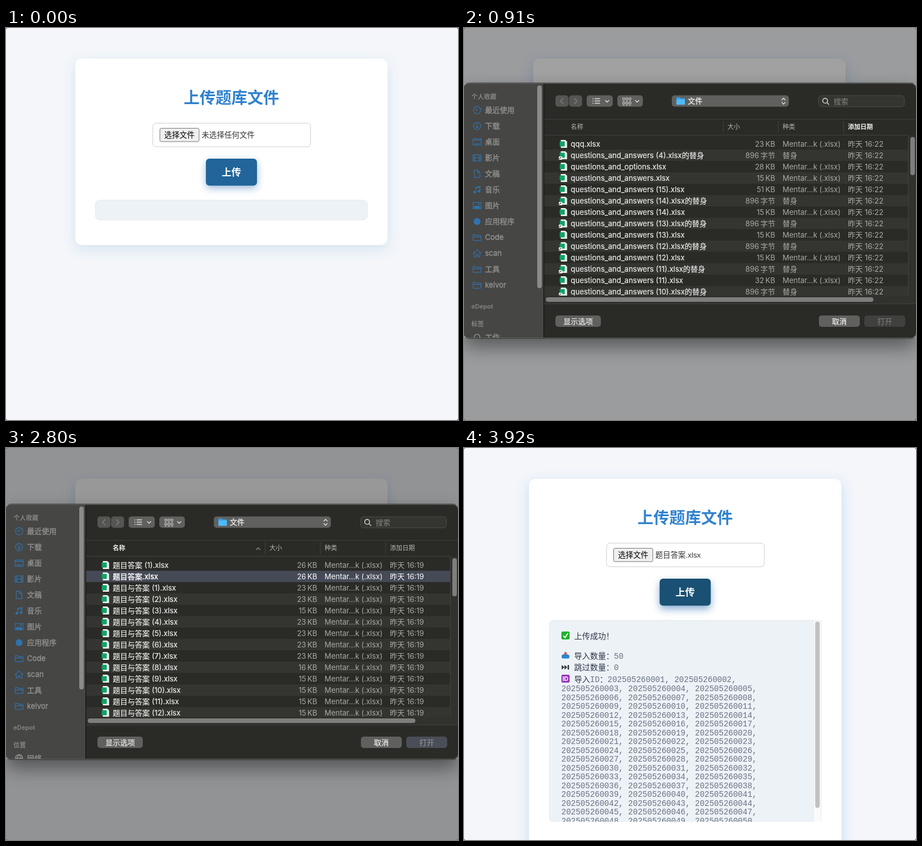
Write an HTML page that moves like this. It is 796 by 690 pixels and loops after 4970 ms.

```html
<!DOCTYPE html>
<html lang="zh-CN">
<head>
<meta charset="utf-8">
<title>上传题库文件</title>
<style>
html, body { margin: 0; width: 100%; height: 100%; overflow: hidden; background: #f4f6fa; }
svg { display: block; width: 100%; height: 100%; }
text { white-space: pre; }
.page { font: 13.33px "Liberation Sans", "Noto Sans CJK SC", sans-serif; }
.log { font: 14px "Liberation Mono", "Noto Sans CJK SC", monospace; fill: #2d3748; }
.thin { fill: #687282; }
.dlg { font: 13px Inter, "Noto Sans CJK SC", sans-serif;
  --side: #464645; --item: #929291; --icon: #2f73ad; --chev: transparent;
  --sel: #464a56; --open: #4a4e58; --openText: #8d8f95; }
.dlg.active { --side: #3a3a39; --item: #efefee; --icon: #1b90f5; --chev: #0b62d9;
  --sel: #0058d0; --open: #0f63dc; --openText: #fff; }
.item { fill: var(--item); stroke: var(--item); stroke-width: .35; }
.icon { fill: none; stroke: var(--icon); stroke-width: 1.2; stroke-linejoin: round; stroke-linecap: round; }
.cap { font-size: 11px; font-weight: 600; fill: #858584; }
.head { font-size: 11px; fill: #b6b7b4; }
.bold { font-weight: 700; fill: #f0f0ee; }
.name { fill: #efefed; stroke: #efefed; stroke-width: .2; }
.info { fill: #a9aaa7; }
.on text { fill: #fff; }
.on .name { stroke: #fff; stroke-width: .4; }
.line { fill: none; stroke: #dededc; stroke-width: 1.4; stroke-linecap: round; stroke-linejoin: round; }
</style>
</head>
<body>
<svg id="stage" viewBox="0 0 796 690" xmlns="http://www.w3.org/2000/svg"></svg>
<script>
const LOOP = 4970, STEP = 70;

const rect = (x, y, w, h, fill, r = 0, more = '') =>
  `<rect x="${x}" y="${y}" width="${w}" height="${h}" rx="${r}" fill="${fill}" ${more}/>`;
const text = (x, y, s, more = '') => `<text x="${x}" y="${y}" ${more}>${s}</text>`;
const path = (d, more = 'class="line"') => `<path d="${d}" ${more}/>`;
const dot = (x, y, r, more = '') => `<circle cx="${x}" cy="${y}" r="${r}" ${more}/>`;
const group = (id, body, more = '') => `<g id="${id}" ${more}>${body}</g>`;

// ---------- upload page ----------
const MID = 'text-anchor="middle"';

function resultLog() {
  const ids = Array.from({ length: 50 }, (_, i) => 202505260001 + i);
  const thin = s => `<tspan class="thin">${s}</tspan>`;
  let s = text(194, 335.5, '上传成功！') + text(194, 371, '导入数量：' + thin(50)) +
    text(194, 391, '跳过数量：' + thin(0)) +
    text(194, 411.5, `导入${thin('ID')}：` + thin(ids.slice(0, 2).join(', ') + ','));
  for (let i = 2, y = 428; i < 50; i += 3, y += 15.5)
    s += text(171.5, y, thin(ids.slice(i, i + 3).join(', ') + (i < 47 ? ',' : '')));
  return s;
}

function logIcons() {
  return rect(171.5, 323, 14.5, 14, '#1db42c', 2.5) +
    path('M175 330.5L178 333.7L183 326', 'fill="none" stroke="#fff" stroke-width="2"') +
    path('M172 365L175 363H182L185.500 365V368.500Q185.500 370.500 183.500 370.500H174Q172 370.500 172 368.500Z', 'fill="#2b86cf"') +
    path('M178.700 358.500L182 362H180V365H177.400V362H175.400Z', 'fill="#d8483c"') +
    path('M172 382L177 386L172 390ZM177 382L182 386L177 390ZM182.500 382H185V390H182.500Z', 'fill="#333c48"') +
    rect(171.5, 399, 14.5, 14, '#9a35bd', 2.5) +
    text(178.7, 410, 'ID', `${MID} style="font:700 10.5px Inter,sans-serif" fill="#fff"`);
}

const page =
  group('cardShade', rect(122, 54, 550, 328, 'inherit', 12, 'id="shadeBox"'), 'filter="url(#b11)"') +
  rect(122, 54, 550, 328, '#fff', 12, 'id="card"') +
  text(397, 133, '上传题库文件', `${MID} font-size="28" font-weight="700" fill="#3182ce"`) +
  rect(258.5, 167.5, 278, 41.5, '#fff', 6, 'id="field"') +
  rect(271, 176.5, 69, 23.5, '#efefef', 2.5, 'stroke="#767676"') +
  text(305.5, 193, '选择文件', `${MID} fill="#000"`) +
  text(344.5, 193, '', 'id="file" fill="#333"') +
  rect(352, 230, 90, 47.5, '#2c6cb0', 6, 'id="btnShade" filter="url(#b7)"') +
  rect(352, 230, 90, 47.5, '', 6, 'id="btn"') +
  text(397, 259.5, '上传', `${MID} font-size="17" font-weight="700" fill="#fff"`) +
  rect(157.5, 303, 479, 35, '#edf2f7', 8, 'id="box" stroke="#e4eaef"');

const result = group('result',
  path('M629 303H158Q150 303 150 311V650Q150 658 158 658H629Z', 'fill="#edf2f7"') +
  path('M616 303.500H158Q150.500 303.500 150.500 311V650Q150.500 658 158 658', 'fill="none" stroke="#e2e8ee"') +
  rect(615, 303, 14, 355, '#fafafa') +
  path('M615 303.500H629M615.500 303V658M629 303V658', 'fill="none" stroke="#e8ebee"') +
  rect(618.5, 305.5, 8, 328, '#c1c1c1', 4) +
  logIcons() + `<g class="log" clip-path="url(#logClip)">${resultLog()}</g>`);

// ---------- file dialog ----------
const FOLDER = 'M-7 4.500V-4Q-7 -5 -6 -5H-2.500L-1 -3.500H6Q7 -3.500 7 -2.500V4.500Q7 5.500 6 5.500H-6Q-7 5.500 -7 4.500ZM-7 -1H7';
const FRAME = 'M-7 -5.500H7V5.500H-7Z';
const RING = dot(0, 0, 6.4);
const p = d => `<path d="${d}"/>`;
const PLACES = [
  ['最近使用', RING + p('M0 -3.500V.300H-3')],
  ['下载', RING + p('M0 -3.500V3.200M-2.500 .800L0 3.300L2.500 .800')],
  ['桌面', p(FRAME + 'M-7 -3H7M-4.500 3.300H4.500')],
  ['影片', p(FRAME + 'M-4 -5.500V5.500M4 -5.500V5.500M-7 -2H-4M-7 2H-4M4 -2H7M4 2H7M-4 0H4')],
  ['文稿', p('M-5 -6.500H1L5 -2.500V6.500H-5ZM1 -6.500V-2.500H5')],
  ['音乐', p('M-2.500 4V-4.500L5 -6V2.500M-2.500 -2.500L5 -4') + dot(-4.2, 4.3, 1.7, 'fill="var(--icon)"') + dot(3.3, 2.9, 1.7, 'fill="var(--icon)"')],
  ['图片', p(FRAME) + path('M-6 4.500L-2.500 0L0 2.500L2.500 .500L6 4.500Z', 'fill="var(--icon)"') + dot(3, -2.4, 0.8)],
  ['应用程序', dot(0, 0, 5.5, 'fill="var(--icon)"')],
  ['Code', p(FOLDER)],
  ['scan', p('M-7 0L0 -6.500L7 0M-5 -1.500V6H-1.500V2H1.500V6H5V-1.500')],
  ['工具', p(FOLDER)],
  ['kelvor', p(FOLDER)]
];
const GRAY = 'style="stroke:#9a9a99"';
const place = (name, icon, y, more = '') =>
  `<g class="icon" ${more} transform="translate(23 ${y - 0.5})">${icon}</g>` + text(37, y + 4, name, 'class="item"');

const sidebar = group('side',
  rect(-1, 105, 141, 449, 'var(--side)') +
  text(13, 133, '个人收藏', 'class="cap"') +
  PLACES.map(([name, icon], i) => place(name, icon, 153 + 28 * i)).join('') +
  text(13, 502, 'eDepot', 'class="cap"') +
  group('sideOld', text(13, 533, '标签', 'class="cap"') + place('工作', dot(0, 0, 5), 552.5, GRAY) +
    rect(129, 109, 8, 357, '#8b8b8a', 4)) +
  group('sideNew', text(13, 533, '位置', 'class="cap"') +
    place('网络', RING + p('M-6.400 0H6.400M0 -6.400Q-6 0 0 6.400M0 -6.400Q6 0 0 6.400'), 552.5, GRAY) +
    rect(129, 109, 8, 322, '#8b8b8a', 4)));

function fileRow(i, name, size, date) {
  const y = 212 + 20 * i, base = y + 4.5, alias = name.endsWith('替身');
  const fill = i % 2 ? '#343531' : '#2a2b27';
  return `<g class="row">${rect(141, y - 10, 641, 20, fill)}` +
    path(`M170.500 ${y - 7}H178.500L181.500 ${y - 4}V${y + 7}H170.500Z`, 'fill="#f2f4f2"') +
    rect(168.5, y - 4.5, 9, 9, '#10a366', 1) +
    (alias ? rect(167, y + 2, 6, 6, '#f5f5f5', 1) +
      path(`M168.300 ${y + 7}Q168.300 ${y + 4} 171.500 ${y + 3.500}`, 'fill="none" stroke="#222"') : '') +
    text(188, base, name, 'class="name"') +
    text(548, base, alias ? '896\u2009字节' : size + '\u2009KB', 'class="info" text-anchor="end"') +
    text(561, base, alias ? '替身' : 'Mentar...k (.xlsx)', 'class="info"') +
    text(676, base, date, 'class="info"') + '</g>';
}

const qa = n => `questions_and_answers (${n}).xlsx`;
const oldFiles = [['qqq.xlsx', 23], [qa(4) + '的替身'], ['questions_and_options.xlsx', 28],
  ['questions_and_answers.xlsx', 15], [qa(15), 51]];
for (let n = 14; n > 9; n--) {
  oldFiles.push([qa(n) + '的替身']);
  if (n > 10) oldFiles.push([qa(n), n === 11 ? 32 : 15]);
}
const newFiles = [['题目答案 (1).xlsx', 26], ['题目答案.xlsx', 26]];
for (let n = 1; n <= 12; n++)
  newFiles.push([`题目与答案 (${n}).xlsx`, n === 8 ? 16 : n === 3 || n > 8 ? 15 : 23]);
const rows = (files, date) => files.map(([name, size], i) => fileRow(i, name, size, date)).join('');

const heads = (a, b) => text(188, 186, '名称', `class="head ${a}"`) + text(676, 186, '添加日期', `class="head ${b}"`);
const button = (x, w, label, fill, color) =>
  rect(x, 514, w, 20, fill, 5) + text(x + w / 2, 528.5, label, `${MID} fill="${color}" stroke="${color}" stroke-width=".25"`);
const hair = (d, color = '#41423f') => path(d, `fill="none" stroke="${color}"`);

function toolbar() {
  let s = rect(161, 126.5, 23, 20, '#555653', 5) + rect(185, 126.5, 23, 20, '#555653', 5) +
    path('M174.500 132L170 136.700L174.500 141.400M194.500 132L199 136.700L194.500 141.400', 'class="line" style="stroke:#80817e"') +
    rect(216, 126.5, 46, 20, '#60615e', 5) + rect(270, 126.5, 45, 20, '#60615e', 5) +
    path('M249 135.500L252 138.500L255 135.500M302 135.500L305 138.500L308 135.500');
  for (const y of [132.5, 136.5, 140.5])
    s += dot(227, y, 0.9, 'fill="#dededc"') + path(`M230.500 ${y}H239`);
  for (const y of [131, 138.5])
    for (const x of [279.5, 285, 290.5])
      s += rect(x, y, 3.6, 3.2, 'none', 0.7, 'stroke="#dededc"') + path(`M${x} ${y + 5.400}h3.600`, 'stroke="#dededc" stroke-width=".8"');
  return s + rect(366, 126.5, 206, 20, '#60615e', 5) +
    path('M374 131.500Q374 130 375.500 130H380L381.500 131.500H387.500Q389 131.500 389 133V141.500Q389 143 387.500 143H375.500Q374 143 374 141.500Z', 'fill="#2f9fe8"') +
    rect(374, 133.5, 15, 9.5, '#4dbaf8', 1.3) +
    text(394, 141.3, '文件', 'fill="#f0f0ee" stroke="#f0f0ee" stroke-width=".3"') +
    rect(554, 127, 17.5, 19, 'var(--chev)', 4.5) +
    path('M559.800 134.500L562.700 131.500L565.600 134.500M559.800 139L562.700 142L565.600 139') +
    rect(624.5, 127, 151, 19.5, '#343531', 5, 'stroke="#4b4c49"') +
    dot(636, 136, 4.3, 'class="line"') + path('M639.300 139.300L642.500 142.500') +
    text(651, 141.5, '搜索', 'fill="#858683"');
}

const dialog =
  `<g clip-path="url(#outside)">${rect(0, 118, 796, 452, '#000', 12, 'opacity=".42" filter="url(#b16)"')}` +
  rect(-2, 104.5, 800, 450, 'none', 11, 'stroke="#000" stroke-opacity=".5"') + '</g>' +
  `<g clip-path="url(#panel)">` + sidebar +
  rect(140, 105, 657, 449, '#2a2b27') + hair('M140.500 106V554', '#0c0c0b') + toolbar() +
  rect(783, 197, 13, 296, '#31322e') + rect(141, 479, 655, 14, '#31322e') +
  hair('M141 168.500H796M141 196.500H783M141 493.500H796M456.500 172V193M553.500 172V193M668.500 172V193M782.500 197V478.500H141') +
  text(464, 186, '大小', 'class="head"') + text(561, 186, '种类', 'class="head"') +
  `<g clip-path="url(#listClip)">` + group('listOld', rows(oldFiles, '昨天 16:22')) +
  group('listNew', rows(newFiles, '昨天 16:19')) + '</g>' +
  group('headOld', heads('', 'bold')) +
  group('headNew', heads('bold', '') + path('M440.500 185L444 181.500L447.500 185', 'class="line" style="stroke:#a0a19e;stroke-width:1.1"')) +
  rect(786, 200, 8, 67, '#7e7f7c', 4) + rect(144, 482, 577, 8, '#7e7f7c', 4) +
  button(161, 80, '显示选项', '#60615e', '#e9e9e7') + button(625, 72, '取消', '#60615e', '#f2f2f0') +
  group('openOff', button(705, 72, '打开', '#40413e', '#767774')) +
  group('openOn', button(705, 72, '打开', 'var(--open)', 'var(--openText)')) +
  '</g>' + rect(-1.5, 105.5, 798, 448, 'none', 10, 'stroke="#636462"');

// ---------- assembly ----------
const blur = n => `<filter id="b${n}" x="-60%" y="-60%" width="220%" height="220%"><feGaussianBlur stdDeviation="${n}"/></filter>`;
const clip = (id, body) => `<clipPath id="${id}">${body}</clipPath>`;
const $ = id => document.getElementById(id);
$('stage').innerHTML = '<defs>' + blur(11) + blur(7) + blur(16) +
  clip('logClip', rect(150, 303, 465, 355, '#000')) +
  clip('listClip', rect(141, 197, 641, 282, '#000')) +
  clip('panel', rect(-1, 105, 798, 449, '#000', 10)) +
  clip('outside', path('M-99 -99H899V799H-99ZM0 106V553H796V106Z', 'clip-rule="evenodd"')) + '</defs>' +
  rect(0, 0, 796, 690, '#f4f6fa') + group('page', page, 'class="page"') + result +
  rect(0, 0, 796, 690, '#000', 0, 'id="dim"') + group('dlg', dialog, 'class="dlg"') +
  path('M0 0H796V690H0ZM3 0Q0 0 0 3V687Q0 690 3 690H793Q796 690 796 687V3Q796 0 793 0Z', 'fill="#444" fill-rule="evenodd"');

const clamp = v => Math.max(0, Math.min(1, v));
const ramp = (t, a, b) => clamp((t - a) / (b - a));
const mix = (a, b, k) => `rgb(${a.map((v, i) => Math.round(v + (b[i] - v) * k))})`;
const set = (id, attrs) => { for (const k in attrs) $(id).setAttribute(k, attrs[k]); };
const show = (id, on) => set(id, { display: on ? 'inline' : 'none' });

const OPENING = [0.35, 0.66, 0.87, 0.97], CLOSING = [0.92, 0.72, 0.45, 0.18, 0.05];
function sheet(t) {
  if (t < 840 || t >= 3080) return 0;
  if (t < 1120) return OPENING[(t - 840) / STEP];
  return t < 2730 ? 1 : CLOSING[(t - 2730) / STEP];
}

function draw(time) {
  const t = Math.floor(time / STEP) * STEP;
  const done = t >= 3850, fresh = t >= 1050, picked = t >= 2520;
  const start = ramp(t, 0, 490);
  const hover = t < 840 ? 0.62 * (1 - start) ** 2 : ramp(t, 3080, 3360);
  const focus = t < 840 ? 1 - (1 - start) ** 2 : 1 - ramp(t, 3010, 3220);

  set('page', { transform: `translate(${done ? -7.5 : 0} 0)` });
  set('card', { height: done ? 700 : 328 });
  set('shadeBox', { y: 61, height: done ? 700 : 328, fill: mix([80, 150, 195], [66, 146, 228], start), opacity: 0.2 + 0.08 * start });
  set('field', { stroke: mix([204, 206, 210], [62, 126, 190], focus) });
  $('file').textContent = t >= 3080 ? '题目答案.xlsx' : '未选择任何文件';
  set('btn', { fill: mix([47, 134, 219], [25, 80, 115], hover) });
  set('btnShade', { y: 233 + 3 * hover, opacity: 0.3 + 0.25 * hover });
  show('box', !done);
  show('result', done);

  const k = sheet(t);
  set('dim', { opacity: 0.56 * k });
  show('dlg', k > 0);
  if (!k) return;
  set('dlg', { transform: `translate(0 ${-40 * (1 - k) ** 1.5})`, opacity: clamp((k - 0.05) / 0.6) });
  set('side', { opacity: clamp(k * 2 + 0.04) });
  $('dlg').classList.toggle('active', fresh && t < 2730);
  for (const part of ['side', 'list', 'head']) {
    show(part + 'Old', !fresh);
    show(part + 'New', fresh);
  }
  const row = $('listNew').children[1];
  row.classList.toggle('on', picked);
  row.firstChild.setAttribute('fill', picked ? 'var(--sel)' : '#343531');
  show('openOn', picked);
  show('openOff', !picked);
}

const t0 = performance.now();
function tick() {
  draw((performance.now() - t0) % LOOP);
  requestAnimationFrame(tick);
}
tick();
</script>
</body>
</html>
```
